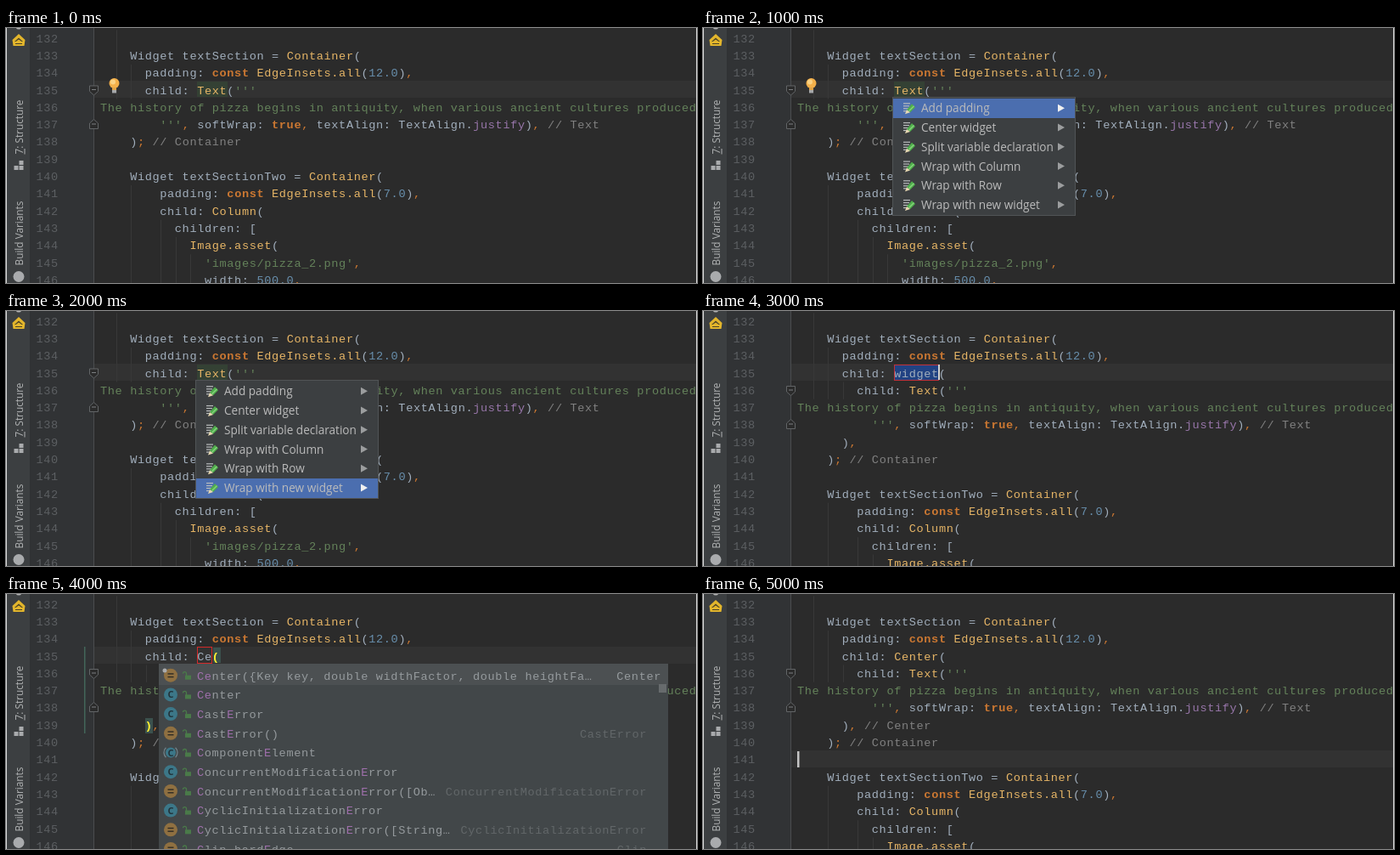
An HTML page with a canvas that plays this animation: 814 px wide and 300 px high, repeating every 6 s.

```html
<!DOCTYPE html>
<html lang="en">
<head>
<meta charset="utf-8">
<title>Wrap with widget</title>
<style>
html, body { margin: 0; width: 100%; height: 100%; overflow: hidden; background: #2b2b2b; }
canvas { display: block; width: 814px; height: 300px; }
</style>
</head>
<body>
<canvas id="stage"></canvas>
<script>
const W = 814, H = 300, STEP = 1000, LOOP = 6000;
const SIZE = 13.6, CW = 8.785, LH = 20.3, LEFT = 111, TOP = 12.3, DROP = 4.3;
const MONO = SIZE + 'px "Liberation Mono", monospace';
const UI = '"Open Sans", sans-serif';
const canvas = document.getElementById('stage');
const ctx = canvas.getContext('2d');
const dpr = window.devicePixelRatio || 1;
canvas.width = W * dpr;
canvas.height = H * dpr;

const PLAIN = '#a1aebc', GREEN = '#64825a', GOLD = '#e6b566', ORANGE = '#cc7832';
const LIST = '#424749', LIST_ON = '#4c5052', LIST_TEXT = '#959a9d';
const STORY = 'The history of pizza begins in antiquity, when various ancient cultures produced';

const head = ['', '    Widget textSection = Container(', '      padding: const EdgeInsets.all(12.0),'];
const tail = [
  '    Widget textSectionTwo = Container(',
  '        padding: const EdgeInsets.all(7.0),',
  '        child: Column(',
  '          children: [',
  '            Image.asset(',
  "              'images/pizza_2.png',",
  '              width: 500.0,'
];
const textEnd = "''', softWrap: true, textAlign: TextAlign.justify), // Text";
const before = [...head, "      child: Text('''", STORY, '        ' + textEnd,
  '    ); // Container', '', ...tail];
const wrapped = (name, note) => [...head, `      child: ${name}(`, "        child: Text('''", STORY,
  '          ' + textEnd, '      ),' + note, '    ); // Container', '', ...tail.slice(0, 5)];

const scenes = [
  { doc: before, row: 3, bulb: true },
  { doc: before, row: 3, bulb: true, menu: 0 },
  { doc: before, row: 3, menu: 5 },
  { doc: wrapped('widget', ''), row: 3, select: true },
  { doc: wrapped('Ce', ''), row: 3, complete: true },
  { doc: wrapped('Center', ' // Center'), row: 9, caret: true }
];

const menuItems = ['Add padding', 'Center widget', 'Split variable declaration',
  'Wrap with Column', 'Wrap with Row', 'Wrap with new widget'];

// kind, label, type shown at the right
const options = [
  ['=', 'Center({Key key, double widthFactor, double heightFa…', 'Center'],
  ['C', 'Center', ''],
  ['C', 'CastError', ''],
  ['=', 'CastError()', 'CastError'],
  ['A', 'ComponentElement', ''],
  ['C', 'ConcurrentModificationError', ''],
  ['=', 'ConcurrentModificationError([Ob…', 'ConcurrentModificationError'],
  ['C', 'CyclicInitializationError', ''],
  ['=', 'CyclicInitializationError([String…', 'CyclicInitializationError'],
  ['=', 'Clip.hardEdge', 'Clip']
];

const colX = c => LEFT + c * CW;
const rowY = r => TOP + r * LH;

function rect(x, y, w, h, color) {
  ctx.fillStyle = color;
  ctx.fillRect(x, y, w, h);
}

function frame(x, y, w, h, color) {
  ctx.strokeStyle = color;
  ctx.lineWidth = 1;
  ctx.strokeRect(x + 0.5, y + 0.5, w - 1, h - 1);
}

function poly(points, fill, stroke) {
  ctx.beginPath();
  points.forEach(([x, y]) => ctx.lineTo(x, y));
  ctx.closePath();
  if (fill) { ctx.fillStyle = fill; ctx.fill(); }
  if (stroke) { ctx.strokeStyle = stroke; ctx.lineWidth = 1; ctx.stroke(); }
}

function disc(x, y, r, color) {
  ctx.fillStyle = color;
  ctx.beginPath();
  ctx.arc(x, y, r, 0, Math.PI * 2);
  ctx.fill();
}

function text(s, x, y, color, font, align = 'left') {
  ctx.font = font;
  ctx.fillStyle = color;
  ctx.textAlign = align;
  ctx.fillText(s, x, y);
}

// monospaced text, centred on a row, on the editor's character grid
function code(s, x, y, color, bold, align) {
  ctx.letterSpacing = (CW - SIZE * 0.6) + 'px';
  text(s, x, y + DROP, color, (bold ? 'bold ' : '') + MONO, align);
  ctx.letterSpacing = '0px';
}

const TOKEN = /\/\/.*|'''|'[^']*'|[,;]|\b(?:const|true)\b|\b\d+\.\d\b|\bEdgeInsets\.all\b|\bImage\.asset\b|\b(?:Container|Text|Column|Center)\b|\bjustify\b/g;

function tokenColor(t) {
  if (t.startsWith('//')) return '#808080';
  if (t[0] === "'") return GREEN;
  if (/^(const|true|[,;])$/.test(t)) return ORANGE;
  if (/^\d/.test(t)) return '#688fad';
  return t === 'justify' ? '#9876aa' : GOLD;
}

function codeLine(s, r) {
  const y = rowY(r);
  if (s === STORY) return code(s, LEFT, y, GREEN);
  let at = 0;
  const put = (part, color) => {
    code(part, colX(at), y, color, /^(const|true)$/.test(part));
    at += part.length;
  };
  for (const m of s.matchAll(TOKEN)) {
    put(s.slice(at, m.index), PLAIN);
    put(m[0], tokenColor(m[0]));
  }
  put(s.slice(at), PLAIN);
}

function sideLabel(s, y) {
  ctx.save();
  ctx.translate(20, y);
  ctx.rotate(-Math.PI / 2);
  text(s, 0, 0, '#b2b4b5', '11.8px ' + UI);
  ctx.restore();
}

function sidebar() {
  rect(0, 0, 28, H, '#3c3f41');
  rect(28, 0, 1, H, '#2f3133');
  disc(15, -2, 3.5, '#b5b5b5');
  poly([[15, 7], [22.5, 14], [21.5, 21], [8.5, 21], [7.5, 14]], '#e3b62c');
  poly([[15, 11.5], [20, 16], [18.5, 16], [15, 13.5], [11.5, 16], [10, 16]], '#4a4226');
  rect(11, 18, 8, 1, '#4a4226');
  sideLabel('7: Structure', 148.5);
  rect(21.5, 142, 1, 6.5, '#b2b4b5');
  for (const [x, y] of [[15.5, 156], [9.5, 162], [15.5, 162]]) rect(x, y, 5, 5, '#a9abad');
  sideLabel('Build Variants', 279.5);
  disc(15, 292.5, 6.5, '#a9abad');
}

function foldMark(y, dir) {
  const p = [[98.5, -5], [108.5, -5], [108.5, 1.5], [103.5, 6], [98.5, 1.5]];
  poly(p.map(([x, d]) => [x, y + d * dir]), '#2b2b2b', '#626567');
  rect(101, y - 1, 5, 1, '#7c7f81');
}

function guide(c, from, to) {
  rect(Math.round(colX(c) + 1), rowY(from) - 10, 1, (to - from + 1) * LH, '#383838');
}

function editor(scene) {
  const { doc, row } = scene;
  const shift = doc === before ? 0 : 2;
  rect(0, 0, W, H, '#2b2b2b');
  rect(28, 0, 75, H, '#313335');
  rect(104, Math.round(rowY(row) - 11), W - 104, 20, '#323232');
  rect(103, 0, 1, H, '#4b4d4f');
  guide(2, 0, shift ? 4 : 3);
  guide(4, 2, shift ? 4 : 3);
  if (shift) guide(6, 4, 4);
  guide(4, 9 + shift, 14);
  guide(8, 11 + shift, 14);
  guide(10, 12 + shift, 14);
  if (!shift) guide(12, 13, 14);

  if (doc === before) rect(225, 63, 36, 18, '#344134');
  if (scene.select) rect(225, 63, 53, 18, '#214283');
  if (scene.complete) {
    rect(244, 63, 9, 18, '#3b514d');
    rect(164, 146, 9, 18, '#3b514d');
    rect(92, 62, 1.5, 102, '#43665a');
  }
  doc.forEach((s, r) => {
    codeLine(s, r);
    code(String(132 + r), 35.5, rowY(r), '#5c5f62');
  });
  if (scene.select) {
    frame(225, 63, 53, 19, '#c0303a');
    rect(277, 63, 2, 18, '#d0d0d0');
  }
  if (scene.complete) {
    frame(225, 62, 18, 20, '#d42a2a');
    code('(', colX(15), rowY(3), '#ffef28', true);
    code(')', colX(6), rowY(7), '#ffef28', true);
  }
  if (scene.caret) rect(111, 185, 2.5, 19, '#c5c5c5');
  foldMark(shift ? 93.5 : 73, 1);
  foldMark(shift ? 133.5 : 113.5, -1);
  if (scene.bulb) bulb();
}

function bulb() {
  disc(127.5, 65, 6, '#f4b04a');
  disc(126, 63.5, 3, '#fbd283');
  rect(125, 70, 5, 3, '#e0a346');
  rect(125, 73, 5, 3.5, '#a6a8aa');
}

function pencil(x, y) {
  for (let i = 0; i < 4; i++) rect(x - 7, y - 6 + i * 3, 8 - i, 1.2, '#b9bcbd');
  poly([[x - 3, y + 2], [x + 3, y - 5], [x + 7, y - 1], [x + 1, y + 5]], '#4fae4b');
  poly([[x - 1, y + 3], [x + 5, y - 3], [x + 6, y - 2], [x, y + 4]], '#86d27d');
  poly([[x - 3, y + 2], [x + 1, y + 5], [x - 5, y + 7]], '#e8d9b2');
}

function menu(active) {
  rect(223, 81, 216, 140, '#3c3f41');
  frame(223, 81, 216, 140, '#515456');
  menuItems.forEach((label, i) => {
    const y = 94.7 + i * 22.75, on = i === active;
    if (on) rect(224, Math.floor(y - 11.4), 214, 23, '#4b6eaf');
    pencil(243, y - 0.5);
    text(label, 257, y + 4.6, '#bbbbbb', '13.6px ' + UI);
    poly([[418, y - 5], [426, y - 0.5], [418, y + 4]], on ? '#f0f0f0' : '#9b9d9e');
  });
}

function kindIcon(kind, y) {
  const x = 194;
  if (kind === 'A') {
    ctx.strokeStyle = '#74868e';
    ctx.lineWidth = 1.2;
    for (const a of [0, Math.PI]) {
      ctx.beginPath();
      ctx.arc(x, y, 8, a - 0.8, a + 0.8);
      ctx.stroke();
    }
  }
  disc(x, y, kind === 'A' ? 6 : 8, kind === '=' ? '#8f7041' : '#3c7788');
  if (kind === '=') {
    rect(x - 3.5, y - 2.5, 7, 1.4, '#2f2b24');
    rect(x - 3.5, y + 1.2, 7, 1.4, '#2f2b24');
  } else {
    text('C', x, y + 4, '#22343b', `bold 11px ${UI}`, 'center');
  }
}

function lock(y) {
  rect(211, y - 0.5, 7, 5, '#4a7a49');
  ctx.strokeStyle = '#4a7a49';
  ctx.lineWidth = 1.3;
  ctx.beginPath();
  ctx.moveTo(212.5, y);
  ctx.arc(210.5, y - 2.5, 2, 0, Math.PI, true);
  ctx.stroke();
}

function completion() {
  rect(180, 82, 600, 218, LIST);
  rect(180, 82, 600, 25, LIST_ON);
  options.forEach(([kind, label, type], i) => {
    const y = 96.2 + i * 22.7;
    kindIcon(kind, y - 0.5);
    lock(y);
    code(label, 225, y, LIST_TEXT);
    // matched letters: the first C, then "e" or a later capital E
    const second = label.startsWith('Ce') ? 1 : label.indexOf('E');
    for (const c of [0, second]) {
      const x = 225 + c * CW;
      rect(x, y - 7, CW, 13, i ? LIST : LIST_ON);
      code(label[c], x, y, '#a070ad');
    }
    code(type, i ? 755 : 772, y, i ? '#626769' : LIST_TEXT, false, 'right');
  });
  disc(187, 90, 2.5, '#a9abad');
  rect(769, 106, 9, 10, '#676b6d');
}

function draw(ms) {
  const scene = scenes[Math.floor((ms % LOOP) / STEP)];
  ctx.setTransform(dpr, 0, 0, dpr, 0, 0);
  editor(scene);
  sidebar();
  if (scene.menu !== undefined) menu(scene.menu);
  if (scene.complete) completion();
  rect(0, 0, 1, H, '#d8d8d8');
  rect(W - 1, 0, 1, H, '#d8d8d8');
}

const start = performance.now();
function tick() {
  draw(performance.now() - start);
  requestAnimationFrame(tick);
}
tick();
</script>
</body>
</html>
```
